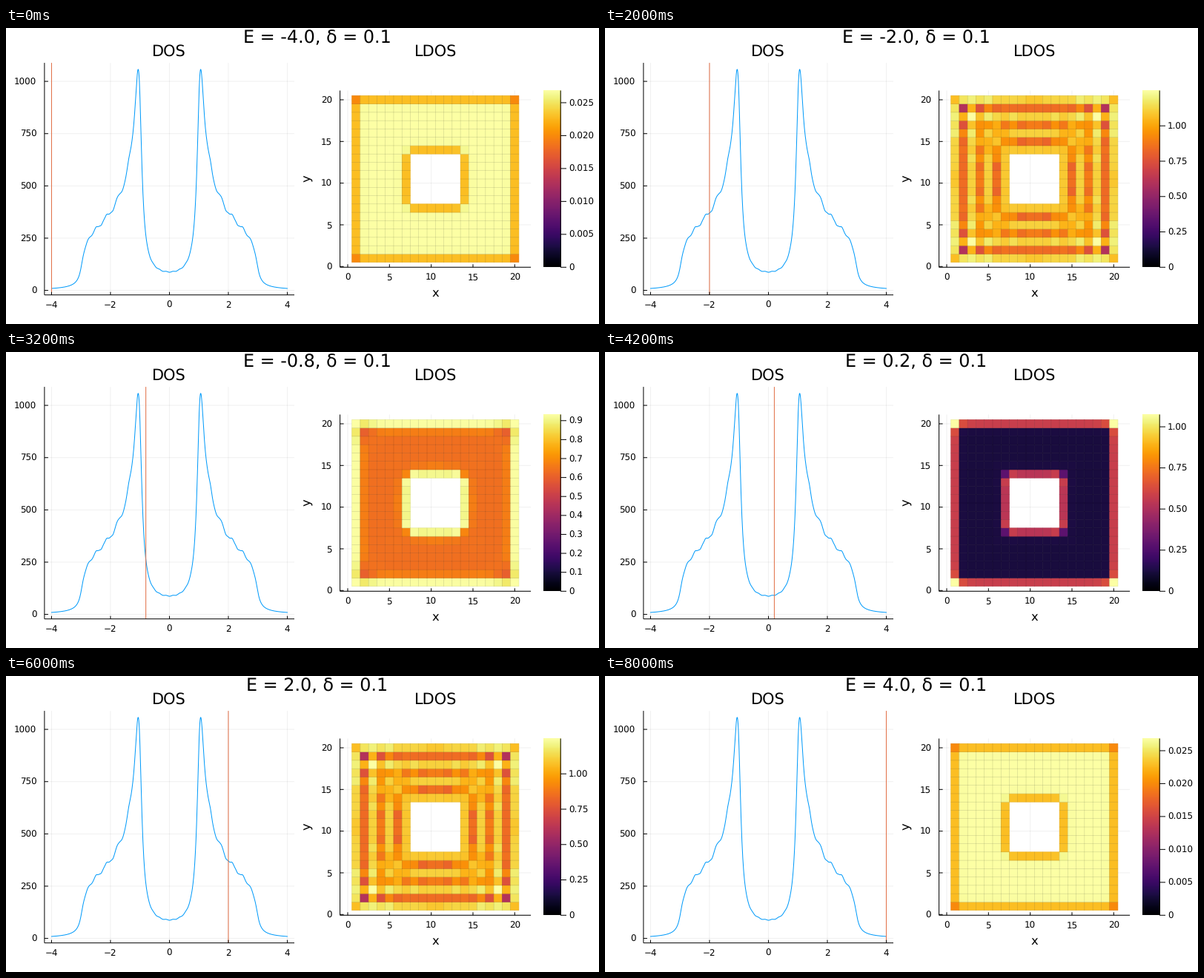
Write a matplotlib script that moves like this. It is 800 by 400 pixels and loops after 8.1 s.

```python
import math

import matplotlib.pyplot as plt
import numpy as np
from matplotlib.animation import FuncAnimation
from matplotlib.collections import LineCollection, PolyCollection

plt.rcParams.update({"font.family": "DejaVu Sans", "text.hinting": "none"})

WIDTH, HEIGHT, DPI = 800, 400, 100
PX = 72 / DPI
DELTA = 0.1
FRAMES = 81
BLUE, ORANGE = "#009afa", "#e26f46"
TICK_SIZE, LABEL_SIZE, TITLE_SIZE, HEAD_SIZE = (s * 1.075 for s in (8, 11, 14, 16))

# Two-band Chern insulator on a 20 x 20 square lattice with a 6 x 6 hole.
sites = [(x, y) for y in range(1, 21) for x in range(1, 21)
         if not (8 <= x <= 13 and 8 <= y <= 13)]
index = {site: i for i, site in enumerate(sites)}
sx = np.array([[0, 1], [1, 0]], complex)
sy = np.array([[0, -1j], [1j, 0]])
sz = np.diag([1, -1]).astype(complex)


def shift(dx, dy):
    hop = np.zeros((len(sites), len(sites)))
    for (x, y), i in index.items():
        j = index.get((x + dx, y + dy))
        if j is not None:
            hop[j, i] = 1
    return hop


hopping = np.kron(shift(1, 0), (sz - 1j * sx) / 2) + np.kron(shift(0, 1), (sz - 1j * sy) / 2)
hamiltonian = np.kron(np.eye(len(sites)), sz) + hopping + hopping.conj().T
levels, states = np.linalg.eigh(hamiltonian)
weights = (np.abs(states) ** 2).reshape(len(sites), 2, -1).sum(axis=1)


def spectrum(energy):
    return DELTA / ((energy - levels) ** 2 + DELTA ** 2)


fig = plt.figure(figsize=(WIDTH / DPI, HEIGHT / DPI), dpi=DPI, facecolor="white")
ax = fig.add_axes([0, 0, 1, 1])


def dos_x(energy):
    return 220.47 + 39.75 * energy


def dos_y(value):
    return 354.6 - 0.2825 * value


def map_x(x):
    return 461 + 11.265 * x


def map_y(y):
    return 322.3 - 11.265 * y


def segment(x0, y0, x1, y1, color="black", zorder=5):
    ax.plot([x0, x1], [y0, y1], color=color, lw=PX, snap=False,
            solid_capstyle="butt", zorder=zorder)


def label(x, y, text, size=TICK_SIZE, ha="center", **kwargs):
    return ax.text(x, y, text, fontsize=size, ha=ha, va="baseline", zorder=6, **kwargs)


def frame_axes(left, right, top, bottom, xticks, yticks, to_x, to_y):
    grid = (0, 0, 0, 0.06)
    for value in xticks:
        x = to_x(value)
        segment(x, top, x, bottom, grid, 0)
        segment(x, bottom - 4, x, bottom)
        label(x, bottom + 17.4, str(value).replace("-", "\u2212"))
    for value in yticks:
        y = to_y(value)
        segment(left, y, right, y, grid, 0)
        segment(left, y, left + 5, y)
        label(left - 10.5, y + 4.4, str(value), ha="right")
    segment(left, top, left, bottom)
    segment(left, bottom, right, bottom)


frame_axes(51.9, 389, 47.1, 360.7, range(-4, 5, 2), range(0, 1001, 250), dos_x, dos_y)
frame_axes(450.6, 708.1, 84.5, 323.3, range(0, 21, 5), range(0, 21, 5), map_x, map_y)
label(220.2, 37.7, "DOS", TITLE_SIZE)
label(579.3, 37.7, "LDOS", TITLE_SIZE)
label(579.3, 363, "x", LABEL_SIZE)
ax.text(407, 203, "y", fontsize=LABEL_SIZE, rotation=90, ha="center", va="center")
heading = label(420, 20.3, "", HEAD_SIZE)

energies = np.linspace(-4, 4, 801)
ax.plot(dos_x(energies), [dos_y(spectrum(e).sum()) for e in energies],
        color=BLUE, lw=PX, zorder=3)
marker, = ax.plot([], [], color=ORANGE, lw=PX, snap=False,
                  solid_capstyle="butt", zorder=4)

corners = [(-0.5, -0.5), (0.5, -0.5), (0.5, 0.5), (-0.5, 0.5)]
cells = [[(map_x(x + dx), map_y(y + dy)) for dx, dy in corners] for x, y in sites]
heat = PolyCollection(cells, cmap="inferno", edgecolors="face", linewidths=0.5 * PX,
                      snap=False, zorder=2)
ax.add_collection(heat)
ax.add_collection(PolyCollection(cells, facecolors="none", edgecolors=(0, 0, 0, 0.1),
                                 linewidths=0.5 * PX, snap=False, zorder=2.5))

BAR_LEFT, BAR_RIGHT, BAR_TOP, BAR_BOTTOM = 724.5, 748.2, 84.5, 323.3
ax.imshow(np.linspace(1, 0, 256)[:, None], cmap="inferno", aspect="auto",
          extent=(BAR_LEFT, BAR_RIGHT, BAR_BOTTOM, BAR_TOP), zorder=2)
segment(BAR_RIGHT, BAR_TOP, BAR_RIGHT, BAR_BOTTOM)
bar_ticks = LineCollection([], colors="black", linewidths=PX, snap=False, zorder=5)
ax.add_collection(bar_ticks)
bar_labels = [label(759, 0, "", ha="left") for _ in range(12)]

ax.set_xlim(0, WIDTH)
ax.set_ylim(HEIGHT, 0)
ax.axis("off")


def tick_step(top):
    """Spacing of the colour bar ticks and the decimals of their labels."""
    power = math.floor(math.log10(top))
    factor = top / 10 ** power
    unit, digits = ((1, 0) if factor > 5 else (0.5, 1) if factor > 2.5
                    else (0.25, 2) if factor > 1 else (0.1, 1))
    return unit * 10.0 ** power, max(0, digits - power)


def update(frame):
    energy = (frame - 40) / 10
    ldos = weights @ spectrum(energy)
    top = ldos.max()
    heading.set_text(f"E = {energy:.1f}, \u03b4 = 0.1")
    marker.set_data([dos_x(energy)] * 2, [47.1, 360.7])
    heat.set_array(ldos)
    heat.set_clim(0, top)

    step, decimals = tick_step(top)
    marks = []
    for i, text in enumerate(bar_labels):
        value = i * step
        if value > top:
            text.set_text("")
            continue
        y = BAR_BOTTOM - (BAR_BOTTOM - BAR_TOP) * value / top
        marks.append([(BAR_RIGHT, y), (756, y)])
        text.set_text(f"{value:.{decimals}f}" if i else "0")
        text.set_y(y + 4.4)
    bar_ticks.set_segments(marks)
    return heading, marker, heat, bar_ticks, *bar_labels


anim = FuncAnimation(fig, update, frames=FRAMES, interval=100, repeat=True, repeat_delay=0)
plt.show()
```
